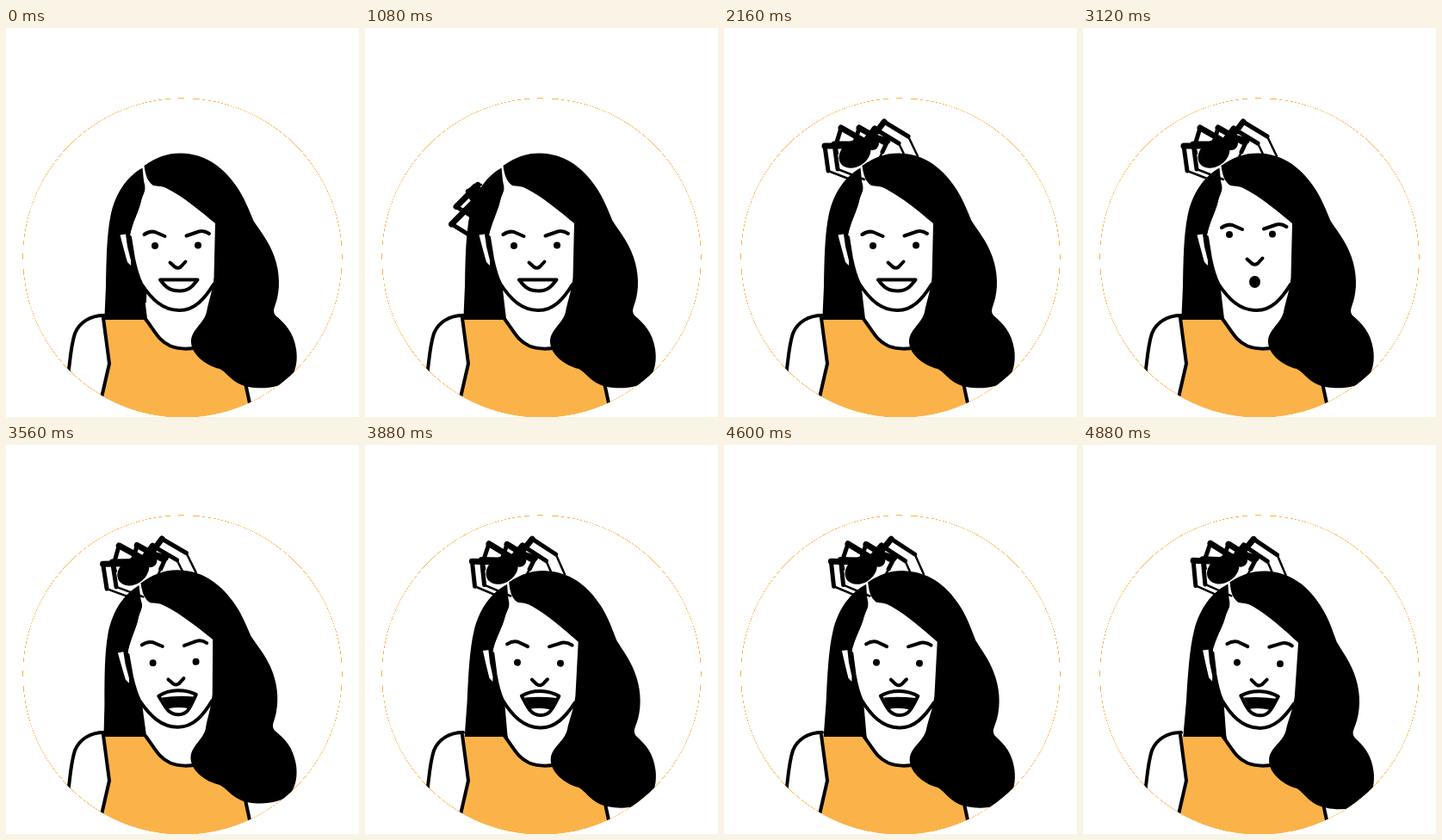
Recreate the animation shown at these times as an HTML page. Size 410 by 452 pixels, loop 5 s.

```html
<!DOCTYPE html>
<html lang="en">
<head>
<meta charset="utf-8">
<title>Spider on the head</title>
<style>
  html, body { margin: 0; width: 100%; height: 100%; overflow: hidden; background: #fff; }
  svg { display: block; width: 100%; height: 100%; }
  .line { fill: none; stroke: #000; stroke-width: 4; stroke-linecap: round; stroke-linejoin: round; }
  .white { fill: #fff; }
</style>
</head>
<body>
<svg viewBox="0 0 410 452">
  <defs>
    <clipPath id="disc"><circle cx="205" cy="267" r="185.500"/></clipPath>
  </defs>
  <g shape-rendering="crispEdges">
    <circle cx="205" cy="267" r="185.600" fill="#fbb349"/>
    <circle class="white" cx="205" cy="267" r="185.100"/>
  </g>
  <g clip-path="url(#disc)">
    <g class="head">
      <g id="spider">
        <ellipse rx="20" ry="15" transform="rotate(-35)"/>
        <circle cx="20" cy="-12" r="8"/>
        <g id="legs" class="line"></g>
      </g>
    </g>
    <path class="white" d="M164 295H243V374H205Q180 365 162 338Z"/>
    <g class="head">
      <path d="M158.500 162.500C140 173 127 192 121.500 218C117 240 116.500 270 116 300L114 346H166L164 338L160 304L149 268L144 243C146 228 155 212 157 202C159 193 162.500 190 161.500 184C159.500 178 159.500 170 158.500 162.500Z"/>
      <path class="white" d="M132.500 240.500L139 239.500L141 254L145 270V276L141 272Q137 258 132.500 240.500Z"/>
    </g>
    <path fill="#fbb349" d="M113 339H162C174 354 178 364 191 370Q205 375 224 371L277 409L286 452H105L120 390Z"/>
    <path class="line" d="M72 404C74 392 75 370 80 355C85 342 98 334 114 334M113 337L120 390L109 438M162 338C174 354 177 363 191 369.500Q205 375 224 371M277 408L285 445"/>
    <g class="head">
      <path class="white" d="M161.500 184C162.500 190 159 193 157 202C155 212 146 228 144 243L148 268L157 297C169 315 182 328 201 328C221 329 235 312 241 300L243 226L190 180Z"/>
      <path class="line" d="M144 243L148 268Q152 287 157 297C169 315 182 328 201 328C219 328.500 231 314 241 298"/>
      <path d="M160.500 160C175 150 187 145.500 203 145.500C230 146 251 160 267 183C277 197 282 211 287.500 224C296 237 303 245 309 259C317 277 319 297 315 314C312 326 309 328 313 334C325 344 334 354 337 373C339 386 337 398 330 408C318 420 287 421 272 414C261 409 256 400 248 396C231 392 214 378 215 363C216 350 230 343 233 330C235 318 240 306 241.500 290L243 227C225 212 207 197 188 187C181 183 176 184 171 183C164 178 162 171 160.500 160Z"/>
      <g class="line">
        <path id="brows" d="M160.500 240Q167 235.500 173 237L184.500 242M209.500 241.500L224 236.500Q230 235 236 239"/>
        <path id="nose" d="M190.500 272.500L196 277.500Q199.500 280 203 277.500L208.500 271.500"/>
        <path id="smile" class="white" d="M179 292.500H222.500C216 301 212 305.500 202 305.500C191 305.500 186 302 179 292.500Z"/>
      </g>
      <g id="eyes"><circle cx="173" cy="253" r="4"/><circle cx="223" cy="252.500" r="4"/></g>
      <ellipse id="gasp" cx="199.500" cy="295" rx="6.500" ry="7"/>
      <g id="laugh">
        <path class="line" style="fill:#fff" d="M179 291.500Q189 285.500 201 285.500Q213 285.500 222.500 290.500C216 304 213 313.500 202 313.500C189 313.500 186 303 179 291.500Z"/>
        <path d="M182.500 293.500Q201 291 220 293L213.500 306.500Q201 304 189.500 306.500Z"/>
      </g>
    </g>
  </g>
</svg>
<script>
const LOOP = 5000;
const el = id => document.getElementById(id);
const heads = document.querySelectorAll('.head');
const mix = (a, b, k) => a + (b - a) * k;
const clamp = v => Math.max(0, Math.min(1, v));
const ramp = (t, a, b) => {
  const k = clamp((t - a) / (b - a));
  return k * k * (3 - 2 * k);
};

// leg shapes from hip to foot; tuck scales a leg about its hip while climbing,
// pair is the offset of the leg's twin
const shapes = [
  { hip: [-6, -9], knee: [-35, -9], ankle: [-31, 20], foot: [0, 32], tuck: 0.3, pair: [11, -2] },
  { hip: [12, -14], knee: [-16, -30], ankle: [-22, -10], foot: [-20, 0], tuck: 1.1, pair: [21, 0] },
  { hip: [18, -16], knee: [34, -37], ankle: [62, -20], foot: [73, 3], tuck: 0.3, pair: [-11, 8] },
  { hip: [20, -20], knee: [38, -15], ankle: [32, -2], foot: [28, 6], tuck: 0.3 }
];

function addPart(width) {
  const p = document.createElementNS('http://www.w3.org/2000/svg', 'path');
  p.setAttribute('stroke-width', width);
  return el('legs').appendChild(p);
}

const legs = shapes.flatMap(s => [[0, 0], s.pair].filter(Boolean).map(shift => ({
  ...s, shift, parts: [7, 5, 2.5].map(addPart)
})));

function placeSpider(t) {
  const k = clamp(t / 2160);
  const bow = k * (1 - k);
  const perch = ramp(t, 1080, 2160);
  const x = mix(157, 152, k) - 74 * bow;
  const y = mix(300, 146, k) - 20 * bow;
  el('spider').setAttribute('transform', `translate(${x} ${y}) rotate(${-75 * (1 - perch)})`);
  for (const leg of legs) {
    const size = mix(leg.tuck, 1, perch);
    const spread = Math.min(1, size);
    const joints = [leg.hip, leg.knee, leg.ankle, leg.foot].map(p =>
      p.map((v, i) => mix(leg.hip[i], v, size) + leg.shift[i] * spread));
    leg.parts.forEach((part, i) => part.setAttribute('d', `M${joints[i]}L${joints[i + 1]}`));
  }
}

function move(id, x, y) {
  el(id).setAttribute('transform', `translate(${x} ${y})`);
}

function grow(id, x, y, sx, sy = sx) {
  const node = el(id);
  node.setAttribute('visibility', sx > 0.02 ? 'visible' : 'hidden');
  node.setAttribute('transform', `translate(${x} ${y}) scale(${sx} ${sy}) translate(${-x} ${-y})`);
}

function draw(t) {
  placeSpider(t);

  const scare = ramp(t, 2380, 2640);
  const joy = ramp(t, 3160, 3320);
  const up = scare * (1 - joy);
  move('brows', 0.5 * up, -8 * scare);
  move('eyes', -3 * up, -13 * up);
  move('nose', 0, -4 * up);

  const pursed = ramp(t, 2380, 2540);
  grow('smile', 200, 296, pursed < 1 ? mix(1, 0.25, pursed) : 0, 1);
  grow('gasp', 199.5, 295, joy > 0 ? 0 : ramp(t, 2460, 2640));
  grow('laugh', 200.5, 298, joy > 0 ? mix(0.3, 1, joy) : 0, mix(0.5, 1, joy));

  const sway = 0.75 + 1.75 * Math.cos((t - 4880) / 240 * 2 * Math.PI);
  const tilt = sway * ramp(t, 3140, 3440);
  heads.forEach(h => h.setAttribute('transform', `rotate(${tilt} 184 390)`));
}

const start = performance.now();
function tick() {
  draw((performance.now() - start) % LOOP);
  requestAnimationFrame(tick);
}
draw(0);
requestAnimationFrame(tick);
</script>
</body>
</html>
```
